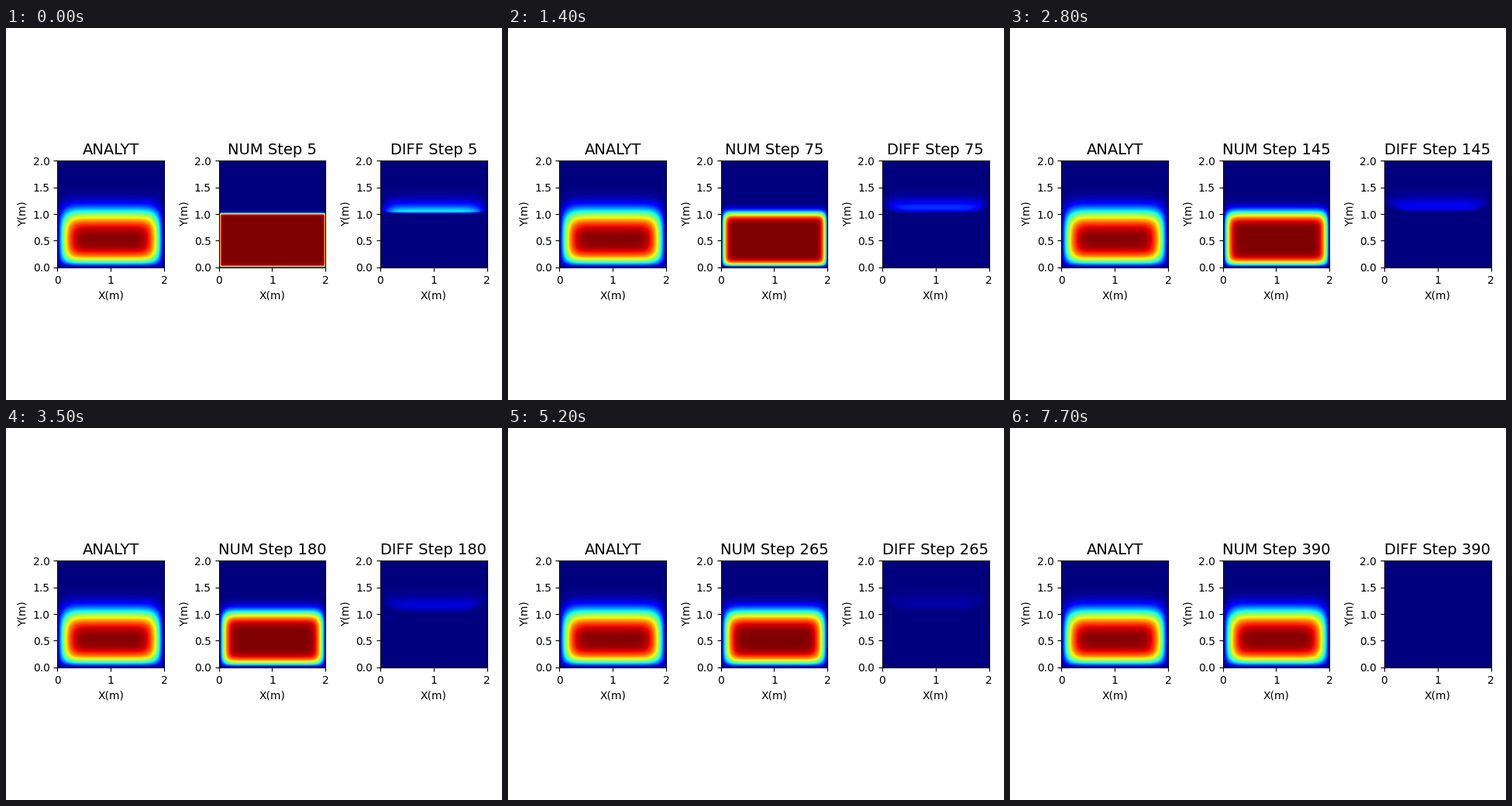
Animation, 640 px wide and 480 px high, one loop 7800 ms. Source, as a matplotlib script:

```python
import math

import numpy as np
import matplotlib.pyplot as plt
from matplotlib.animation import FuncAnimation

SIZE = 2.0          # side of the square plate, m
N = 101             # grid nodes per side
DX = SIZE / (N - 1)
R = 0.1             # diffusion number of the explicit scheme
STRIDE = 5          # time steps per picture
FRAMES = 78
END_STEP = 400      # step at which the closed form is evaluated

erf = np.vectorize(math.erf)


def closed_form(step):
    """Heated lower half with cold walls, as a product of 1D solutions."""
    q = 2 * DX * math.sqrt(R * step)
    s = np.linspace(0, SIZE, N)
    across = erf(s / q) * erf((SIZE - s) / q)
    up = erf(s / q) + 0.5 * erf((1 - s) / q) - 0.5 * erf((1 + s) / q)
    return np.outer(up, across)


def simulate():
    """Explicit finite differences, sampled every STRIDE steps."""
    u = np.zeros((N, N))
    u[1:N // 2 + 1, 1:-1] = 1.0
    states = []
    for step in range(1, FRAMES * STRIDE + 1):
        lap = (u[2:, 1:-1] + u[:-2, 1:-1] + u[1:-1, 2:] + u[1:-1, :-2]
               - 4 * u[1:-1, 1:-1])
        u[1:-1, 1:-1] += R * lap
        if step % STRIDE == 0:
            states.append(u.copy())
    return states


def panel(ax, field, title):
    half = DX / 2
    image = ax.imshow(field, origin="lower", cmap="jet", vmin=0, vmax=1,
                      interpolation="bilinear",
                      extent=(-half, SIZE + half, -half, SIZE + half))
    ax.set(xlim=(0, SIZE), ylim=(0, SIZE), xlabel="X(m)", ylabel="Y(m)",
           xticks=[0, 1, 2], yticks=[0, 0.5, 1, 1.5, 2])
    ax.set_title(title, fontsize=14)
    return image


exact = closed_form(END_STEP)
states = simulate()

fig, (ax_exact, ax_num, ax_diff) = plt.subplots(1, 3, figsize=(6.4, 4.8),
                                                dpi=100)
panel(ax_exact, exact, "ANALYT")
num_image = panel(ax_num, states[0], f"NUM Step {STRIDE}")
diff_image = panel(ax_diff, exact - states[0], f"DIFF Step {STRIDE}")
fig.tight_layout()


def update(i):
    step = (i + 1) * STRIDE
    num_image.set_data(states[i])
    diff_image.set_data(exact - states[i])
    ax_num.set_title(f"NUM Step {step}", fontsize=14)
    ax_diff.set_title(f"DIFF Step {step}", fontsize=14)
    return num_image, diff_image


anim = FuncAnimation(fig, update, frames=FRAMES, interval=100, repeat=True,
                     repeat_delay=0, blit=False)
plt.show()
```
